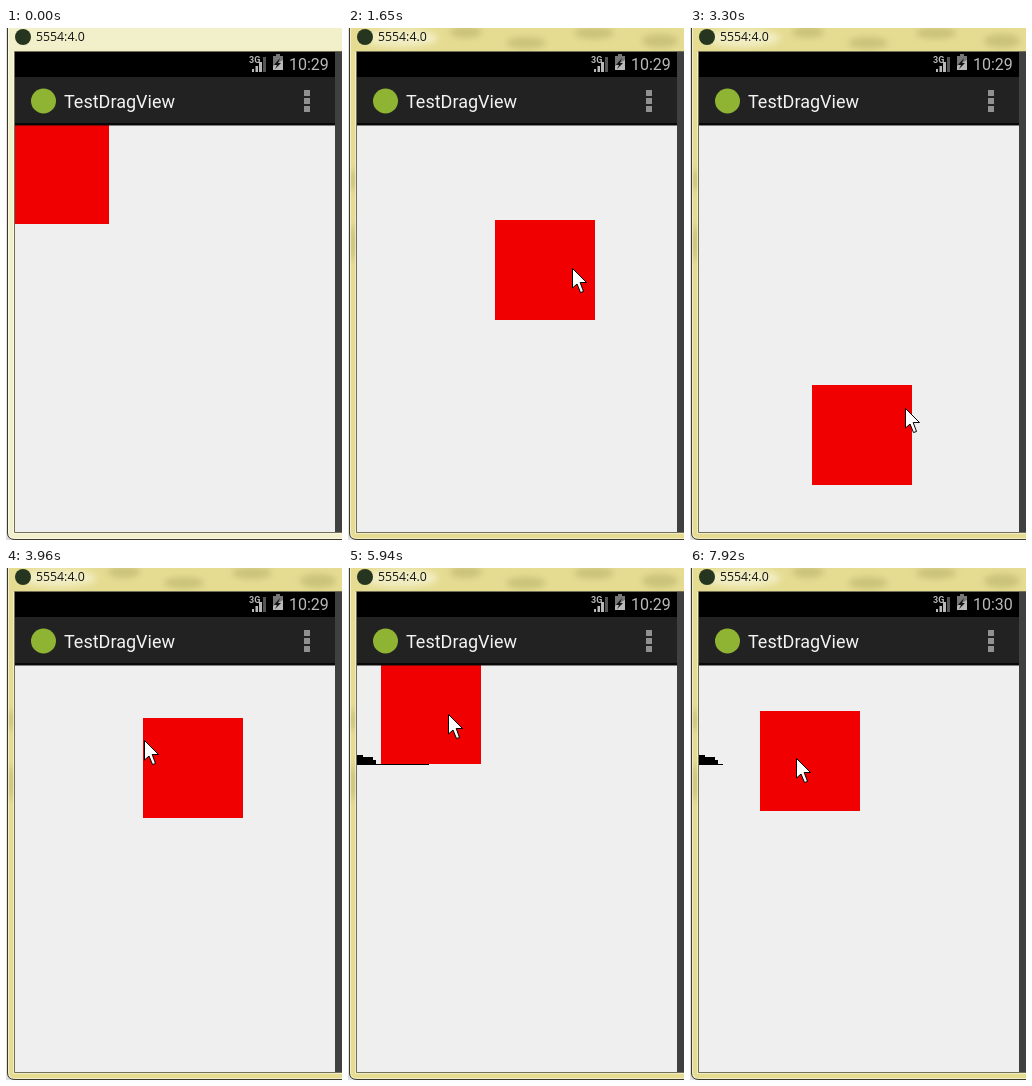
Write an HTML page that moves like this. It is 336 px wide and 512 px high and loops after 8000 ms.

```html
<!DOCTYPE html>
<html lang="en">
<head>
<meta charset="utf-8">
<title>TestDragView</title>
<style>
  html, body { margin: 0; width: 100%; height: 100%; overflow: hidden; background: #dfe0e0; }
  svg { display: block; width: 336px; height: 512px; }
  text { white-space: pre; }
  .ui { font-family: Roboto, sans-serif; }
  .caption { font: 12.3px "Open Sans", sans-serif; }
</style>
</head>
<body>
<svg viewBox="0 0 336 512" xmlns="http://www.w3.org/2000/svg">
  <defs>
    <clipPath id="client"><rect x="9" y="97" width="320" height="407"/></clipPath>
    <clipPath id="frameClip"><path d="M2 0H336V511H8Q2 511 2 505Z"/></clipPath>
    <filter id="blur" x="-50%" y="-50%" width="200%" height="200%"><feGaussianBlur stdDeviation="3"/></filter>
  </defs>

  <!-- window frame -->
  <rect width="336" height="512" fill="#dfe0e0"/>
  <g clip-path="url(#frameClip)">
    <rect id="glass" width="336" height="512" fill="#f2f0ca"/>
    <g id="blotches" filter="url(#blur)" visibility="hidden">
      <g fill="#cbc27a">
        <ellipse cx="118" cy="4" rx="16" ry="6"/><ellipse cx="178" cy="15" rx="20" ry="6"/>
        <ellipse cx="246" cy="5" rx="20" ry="6"/><ellipse cx="312" cy="13" rx="18" ry="7"/>
        <ellipse cx="5" cy="152" rx="4" ry="11"/><ellipse cx="5" cy="215" rx="4" ry="18"/>
      </g>
      <ellipse cx="52" cy="10" rx="38" ry="9" fill="#f2eec4"/>
    </g>
    <path d="M2.500 0V504Q2.500 510.500 9 510.500H336M7.500 24V505.500H336"
          fill="none" stroke="#fff" stroke-opacity=".5"/>
  </g>
  <path d="M1.500 0V505Q1.500 511.500 9 511.500H336" fill="none" stroke="#3b3a2c"/>
  <path d="M336 23.500H8.500V504.500H336" fill="none" stroke="#716f55"/>
  <circle cx="17" cy="9" r="8" fill="#26351f"/>
  <text class="caption" x="30" y="13" fill="#111">5554:4.0</text>

  <!-- device screen -->
  <rect x="9" y="24" width="327" height="480" fill="#404040"/>
  <rect x="9" y="24" width="320" height="25" fill="#000"/>
  <rect x="9" y="49" width="320" height="48" fill="#222"/>
  <rect x="9" y="95" width="320" height="2" fill="#080808"/>
  <rect x="9" y="97" width="320" height="407" fill="#efefef"/>

  <g class="ui" fill="#b9b9b9">
    <text x="243" y="35" font-size="9" font-weight="700">3G</text>
    <path d="M246 44V41H248V44ZM249.500 44V38H252V44ZM253 44V34H256V44Z"/>
    <path d="M257 44V29H260V44Z" fill="#555"/>
    <path d="M267 28H270V26H274V28H277V42H267Z" fill="#777"/>
    <path d="M267 38L277 32V42H267Z"/>
    <path d="M274 30L268 37H271L269 41L275 35H272Z" fill="#111"/>
    <text id="clock" x="283" y="42" font-size="16">10:29</text>
  </g>
  <circle cx="37.500" cy="73" r="12.500" fill="#8fb433"/>
  <text class="ui" x="58" y="80" font-size="18" fill="#f3f3f3">TestDragView</text>
  <path d="M298 62h6v6h-6zM298 70h6v6h-6zM298 78h6v6h-6z" fill="#909090"/>

  <g clip-path="url(#client)">
    <path id="residue" d="M9 187H15V189H25V192H28V196H81V197H9Z"/>
    <rect id="square" width="100" height="100" fill="#f00000"/>
    <rect x="9" y="97" width="320" height="1" fill="#101010" opacity=".5"/>
  </g>
  <path id="cursor" d="M.5.5V20L5 16L8.500 24.500L11.500 23.500L8.200 14.500H14.500Z"
        fill="#fff" stroke="#000" stroke-linejoin="round"/>
</svg>
<script>
  const LOOP = 8000, STEP = 330;
  const GRAB = 3, RELEASE = 22, RESIDUE = 15, TRIMMED = 19;
  const LEAD = .5; // steps by which the pointer runs ahead of the square

  // turning points of the drag: step, x, y
  const drag = [
    [GRAB, 3, 96], [5, 147, 192], [7, 190, 202], [8, 102, 296], [9, 25, 313],
    [10, 122, 357], [11, 179, 296], [12, 137, 150], [13, 26, 126], [14, -20, 105],
    [16, -12, 78], [18, 33, 96], [20, 70, 131], [RELEASE, 70, 143]
  ];

  const clamp = (v, lo, hi) => Math.min(hi, Math.max(lo, v));

  function slope(i, axis) {
    const before = drag[i - 1], after = drag[i + 1];
    return before && after ? (after[axis] - before[axis]) / (after[0] - before[0]) : 0;
  }

  // Smooth curve through the turning points, at rest at both ends.
  function dragAt(step) {
    const t = clamp(step, GRAB, RELEASE);
    const i = Math.max(1, drag.findIndex(key => key[0] >= t));
    const a = drag[i - 1], b = drag[i];
    const span = b[0] - a[0], u = (t - a[0]) / span, v = 1 - u;
    return [1, 2].map(axis =>
      a[axis] + (b[axis] - a[axis]) * u * u * (3 - 2 * u) +
      span * u * v * (v * slope(i - 1, axis) - u * slope(i, axis)));
  }

  function pointerAt(step) {
    const [x, y] = dragAt(step > GRAB ? step + LEAD : step);
    const approach = Math.max(0, GRAB - 1 - step);
    const away = clamp(step - RELEASE, 0, 1);
    return [x + 56 + 39 * approach - 20 * away, y + 42 - 37 * approach + 5 * away];
  }

  const el = id => document.getElementById(id);
  const [glass, blotches, clock, residue, square, cursor] =
    ["glass", "blotches", "clock", "residue", "square", "cursor"].map(el);
  const show = (node, on) => node.setAttribute("visibility", on ? "visible" : "hidden");
  const move = (node, point) =>
    node.setAttribute("transform", `translate(${point.map(Math.round).join(" ")})`);

  function render(time) {
    const step = Math.floor((time % LOOP) / STEP);
    const active = step >= GRAB;
    move(square, dragAt(step));
    move(cursor, pointerAt(step));
    show(cursor, step > 0);
    glass.setAttribute("fill", active ? "#e5dc92" : "#f2f0ca");
    show(blotches, active);
    show(residue, step >= RESIDUE);
    residue.style.clipPath = step >= TRIMMED ? "inset(0 48px 0 0)" : "none";
    clock.textContent = step >= RELEASE ? "10:30" : "10:29";
  }

  const start = performance.now();
  function tick() {
    render(performance.now() - start);
    requestAnimationFrame(tick);
  }
  tick();
</script>
</body>
</html>
```
